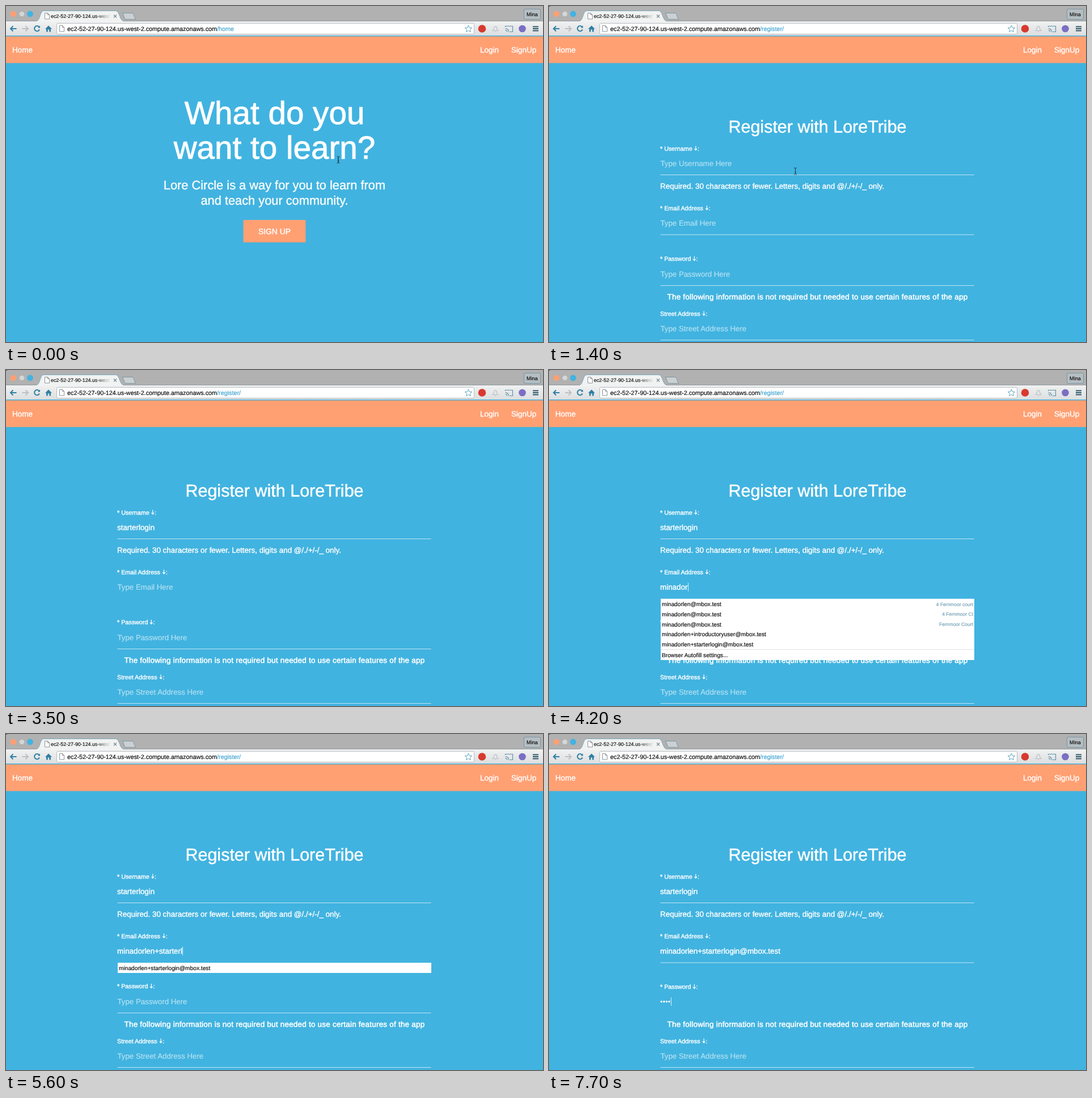
Animation of 947 by 592 pixels, one loop 8 s. Source, as an HTML page:

```html
<!DOCTYPE html>
<html lang="en">
<head>
<meta charset="utf-8">
<title>Sign-up walkthrough</title>
<style>
  html, body { margin: 0; width: 100%; height: 100%; overflow: hidden; background: #41b3e0; }
  svg { display: block; width: 947px; height: 592px; }
  text { font-family: "Liberation Sans", Arial, sans-serif; text-rendering: geometricPrecision; white-space: pre; }
  .mid { stroke-width: .4px; }
</style>
</head>
<body>
<svg id="stage" viewBox="0 0 947 592">
  <defs>
    <linearGradient id="bar" x2="0" y2="1">
      <stop offset="0" stop-color="#f1f2f2"/><stop offset="1" stop-color="#dcdedf"/>
    </linearGradient>
    <linearGradient id="fade">
      <stop offset="0" stop-color="#f1f2f2" stop-opacity="0"/><stop offset="1" stop-color="#f1f2f2"/>
    </linearGradient>
  </defs>
  <g id="browser"></g>
  <g id="page"></g>
</svg>
<script>
const BLUE = '#41b3e0', ORANGE = '#ffa073', LINE = '#c0e5f4', INK = '#0c0c0c', STEEL = '#2f7fa3';
const HOST = 'ec2-52-27-90-124.us-west-2.compute.amazonaws.com';
const USER = 'starterlogin', NAME = 'minadorlen', MAIL = '@mbox.test';
const EMAIL = NAME + '+' + USER + MAIL;
const STEP = 700, LOOP = 8000;

// One entry per step; each one replaces the whole page state.
const steps = [
  { home: true, beam: [586, 271] },
  { home: true, hand: [474, 398] },
  { beam: [434.5, 291] },
  { focus: 'user', user: 4, list: 'user' },
  { focus: 'user', user: 9, list: 'user' },
  { focus: 'email', user: 12 },
  { focus: 'email', user: 12, email: 7, list: 'all' },
  { focus: 'email', user: 12, email: 10, list: 'all' },
  { focus: 'email', user: 12, email: 19, list: 'one' },
  { focus: 'email', user: 12, email: 26, list: 'one' },
  { focus: 'pass', user: 12, email: EMAIL.length },
  { focus: 'pass', user: 12, email: EMAIL.length, pass: 4 }
];

const browser = document.getElementById('browser');
const page = document.getElementById('page');
const pen = document.createElement('canvas').getContext('2d');

const rect = (x, y, w, h, fill, more = '') =>
  `<rect x="${x}" y="${y}" width="${w}" height="${h}" fill="${fill}" ${more}/>`;
const dot = (x, y, r, fill) => `<circle cx="${x}" cy="${y}" r="${r}" fill="${fill}"/>`;
const path = (d, stroke, width = 1, fill = 'none') =>
  `<path d="${d}" stroke="${stroke}" stroke-width="${width}" fill="${fill}"/>`;
// A hairline stroke gives the type its slightly heavier weight.
const text = (x, y, size, str, fill = '#fff', more = '') =>
  `<text x="${x}" y="${y}" font-size="${size}" fill="${fill}" stroke="${fill}" stroke-width="${size * .016}" ${more}>${str}</text>`;
const centred = (y, size, str, more = '') => text(473.5, y, size, str, '#fff', `text-anchor="middle" ${more}`);
const MID = 'class="mid"';

function widthOf(str, size) {
  pen.font = `${size}px "Liberation Sans", Arial, sans-serif`;
  return pen.measureText(str).width;
}

const sheet = (x, y) => path(`M${x} ${y}h5l3 3v7.5h-8zM${x + 5} ${y}v3h3`, '#8a9298', 1, '#fff');

function drawBrowser() {
  const points = [];
  for (let i = 0; i < 10; i++) {
    const r = i % 2 ? 2.9 : 6.6, a = -Math.PI / 2 + i * Math.PI / 5;
    points.push(`${(815.5 + r * Math.cos(a)).toFixed(1)} ${(40.5 + r * Math.sin(a)).toFixed(1)}`);
  }
  return [
    rect(0, 0, 947, 27, '#b1b1b1'),
    rect(0, 26, 947, 27, 'url(#bar)'),
    path('M0 26.5H947', '#929a9e'),
    path('M54 26.5C60 26 60 9 66 8.5H194C200 9 201 26 207 26.5', '#79a9bf', 1, '#f1f2f2'),
    rect(55, 26, 151, 2, '#f1f2f2'),
    path('M205 12.5H223C226 14 226 21 229 23.5H211C208 22 208 15 205 12.5Z', '#7c97a3', 1, '#cbd0d2'),
    dot(13, 14, 5.3, ORANGE), dot(28, 14, 4.3, '#d4d6d7'), dot(42.5, 14, 5.4, BLUE),
    sheet(68.5, 12.5),
    text(79, 21, 8.9, 'ec2-52-27-90-124.us-west', INK),
    rect(158, 11, 27, 14, 'url(#fade)'),
    path('M190 15.5l5 5m0-5l-5 5', '#78868e', 1.1),
    rect(913.5, 5.5, 29, 18, '#b6bec2', 'rx="1.5" stroke="#7697a6"'),
    text(918, 18, 9.2, 'Mina', INK),
    // toolbar
    path('M18.5 40H8.5M12.5 35.5L8 40l4.5 4.5', STEEL, 2),
    path('M28.5 40H38.5M34.5 35.5L39 40l-4.5 4.5', '#bcc1c4', 2),
    path('M58.5 37A4.6 4.6 0 1 0 59 41.5', STEEL, 2),
    path('M56 38.5h4v-4z', 'none', 0, STEEL),
    path('M69 40.5L75 34.5L81 40.5H79V45.5H76.3V41.5H73.7V45.5H71V40.5Z', 'none', 0, STEEL),
    rect(89.5, 30.5, 736, 19, '#fff', 'rx="2" stroke="#b5bcc0"'),
    sheet(94.5, 34.5),
    path(`M${points.join('L')}Z`, '#65a5c1', 1, '#fff'),
    dot(839.5, 40, 6.8, '#d8392e'),
    path('M858.5 43.5C861 42 859.5 36 863 35.5C866.5 36 865 42 867.5 43.5ZM862 45.5h2', '#b9bec1', 1.2),
    path('M880.5 37V35.5H893.5V45.5H888M880.5 39.5a6 6 0 0 1 6 6M880.5 42.5a3 3 0 0 1 3 3', '#5b94ae', 1.2),
    dot(910.5, 40, 6.3, '#7b6fc4'),
    path('M929 36.5h10M929 40h10M929 43.5h10', '#31586a', 2),
    rect(0, 52, 947, 1.5, BLUE),
    rect(0, 53.5, 947, 47, ORANGE),
    text(11, 81.5, 13.5, 'Home', '#fff', MID),
    text(836, 81.5, 13.5, 'Login', '#fff', MID),
    text(891, 81.5, 13.5, 'SignUp', '#fff', MID)
  ].join('');
}

const beam = ([x, y]) =>
  path(`M${x - 2.5} ${y - 6}q2.5 0 2.5 2v8q0 2-2.5 2M${x + 2.5} ${y - 6}q-2.5 0-2.5 2v8q0 2 2.5 2M${x - 1.5} ${y + 2}h3`, '#1b3c4b');
const hand = ([x, y]) =>
  path(`M${x} ${y + 7}V${y - 4}q1.5-2 3 0V${y + 1}q5-1 6.5 2v4q-1 3-2 6H${x}L${x - 4} ${y + 7}q0-3 4 0`, '#222', 1, '#fff');

function address(tail) {
  const size = 10.8;
  return text(108, 43.5, size, HOST, INK) +
    text(108 + widthOf(HOST, size), 43.5, size, tail, '#3fa3cf');
}

function drawHome(s) {
  let out = address('/home') +
    centred(208, 56.6, 'What do you') +
    centred(269, 56.6, 'want to learn?') +
    centred(323, 21.8, 'Lore Circle is a way for you to learn from') +
    centred(350, 21.8, 'and teach your community.') +
    rect(418.5, 377, 110, 39.5, ORANGE, 'rx="1"') +
    centred(402, 13.9, 'SIGN UP', MID);
  if (s.hand) {
    out += rect(-2, 575.5, 305, 19, '#e6e8e9', 'rx="2" stroke="#b5bcc0"') +
      text(5, 587.5, 10.2, HOST + '/register/', '#666');
  }
  return out;
}

function label(str, y, star = true) {
  const size = 10.75, start = (star ? '* ' : '') + str;
  const x = 196 + widthOf(start, size) + 6;
  return text(196, y, size, start, '#fff', MID) +
    path(`M${x} ${y - 8}v7.5M${x - 2.2} ${y - 3}l2.2 2.5l2.2-2.5`, '#fff', 1.2) +
    text(x + 3.2, y, size, ':', '#fff', MID);
}

const rule = y => rect(196.5, y, 553, 1, LINE);
const caret = (x, y) => rect(Math.round(x), y - 12, 1, 15, '#d8f0fa');

// A field shows its typed text, or its placeholder while empty.
function field(y, name, typed, active) {
  if (!typed) return text(196.5, y, 13.25, `Type ${name} Here`, '#fff', 'opacity=".6"');
  return text(196, y, 13.4, typed, '#fff', MID) +
    (active ? caret(196 + widthOf(typed, 13.4) + .5, y) : '');
}

function suggestions(kind) {
  const y = kind === 'user' ? 299 : 403;
  const rows = kind === 'user' ? [[USER]] : kind === 'one' ? [[EMAIL]] : [
    [NAME + MAIL, '4 Fernmoor court'],
    [NAME + MAIL, '4 Fernmoor Ct'],
    [NAME + MAIL, 'Fernmoor Court'],
    [NAME + '+introductoryuser' + MAIL],
    [EMAIL]
  ];
  const all = kind === 'all';
  let out = rect(197, y, 553, all ? 108 : 18, '#fff');
  rows.forEach(([main, note], i) => {
    const base = y + 13 + i * 17.8;
    out += text(199, base, 10.2, main, INK);
    if (note) out += text(748, base - .5, 8.5, note, '#6a9cb2', 'text-anchor="end"');
  });
  if (all) out += rect(197, 492, 553, 1, '#dce3e6') + text(199, 505.5, 10.2, 'Browser Autofill settings...', INK);
  return out;
}

function drawForm(s) {
  const { focus } = s;
  const passUp = focus === 'email' ? 1 : 0;
  const restUp = focus === 'email' || focus === 'pass' ? 1 : 0;
  let out = address('/register/') +
    centred(222.5, 30.5, 'Register with LoreTribe') +
    label('Username', 254.5) +
    field(282, 'Username', USER.slice(0, s.user || 0), focus === 'user') +
    text(196, 322, 13.43, 'Required. 30 characters or fewer. Letters, digits and @/./+/-/_ only.', '#fff', MID) +
    label('Email Address', 359.5) +
    field(387, 'Email', EMAIL.slice(0, s.email || 0), focus === 'email') +
    label('Password', 449 - passUp);
  if (s.pass) {
    for (let i = 0; i < s.pass; i++) out += dot(198.3 + i * 4.6, 471.5, 1.7, '#fff');
    out += caret(196 + s.pass * 4.6 + .3, 476);
  } else {
    out += field(476.5 - passUp, 'Password');
  }
  if (focus !== 'user') out += rule(297);
  if (focus !== 'email') out += rule(402.5);
  if (focus !== 'pass') out += rule(492 - passUp);
  out += text(208.5, 516.5 - restUp, 13.45,
      'The following information is not required but needed to use certain features of the app',
      '#fff', 'style="stroke-width:.55px;letter-spacing:.235px"') +
    label('Street Address', 545.5 - restUp, false) +
    field(572.5 - restUp, 'Street Address') +
    rule(588 - restUp);
  return out + (s.list ? suggestions(s.list) : '');
}

let shown = -1;
const begin = performance.now();
function tick(now) {
  const t = Math.max(0, now - begin) % LOOP;
  const i = Math.min(steps.length - 1, Math.floor(t / STEP));
  if (i !== shown) {
    const s = steps[shown = i];
    page.innerHTML = (s.home ? drawHome(s) : drawForm(s)) +
      (s.beam ? beam(s.beam) : '') + (s.hand ? hand(s.hand) : '') +
      (i ? rect(0, 0, 2, 1, '#444') : '');
  }
  requestAnimationFrame(tick);
}
browser.innerHTML = drawBrowser();
tick(begin);
</script>
</body>
</html>
```
